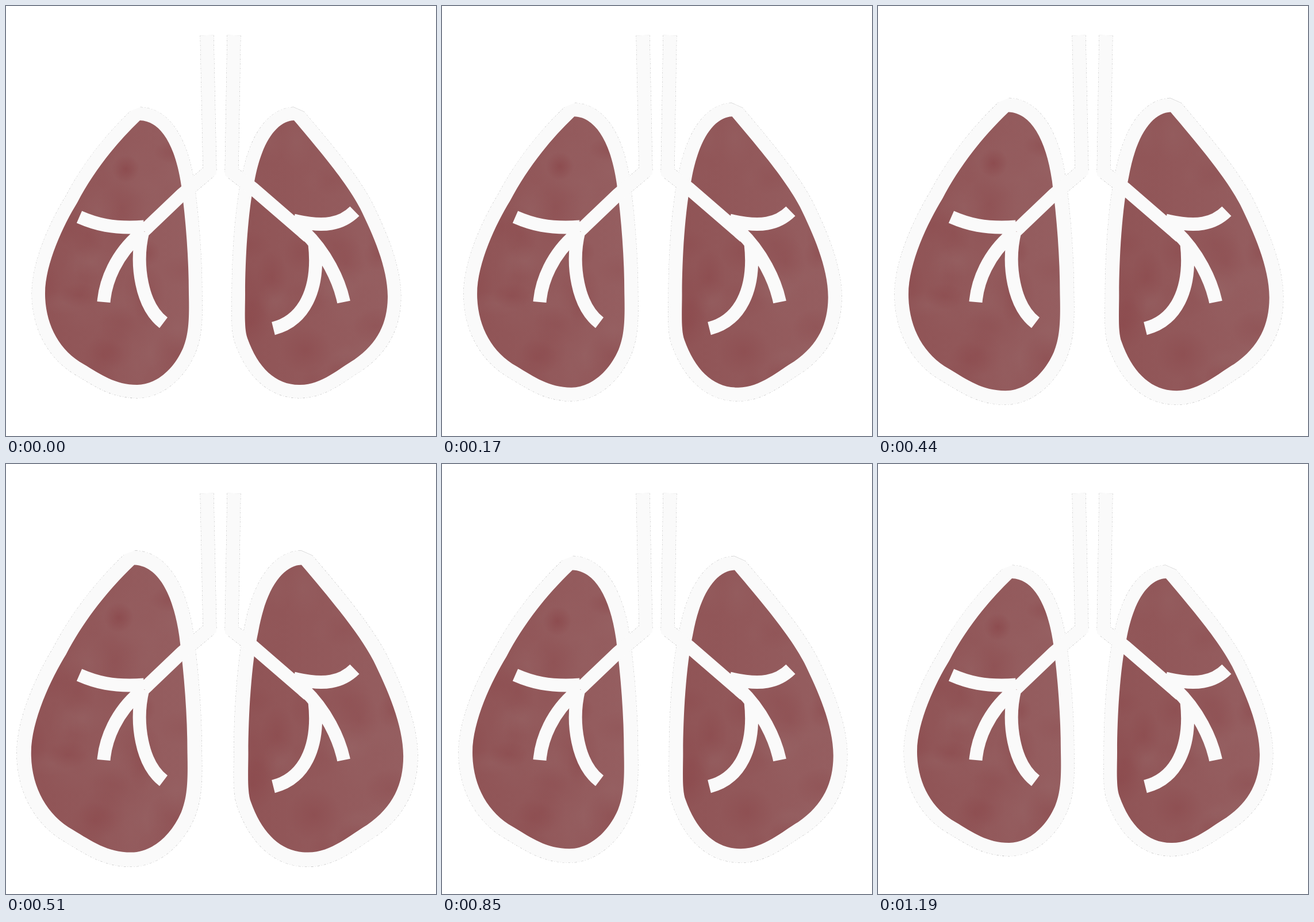
An HTML page for the animation above (1360 ms loop, 748 px wide and 748 px high).

```html
<!DOCTYPE html>
<html lang="en">
<head>
<meta charset="utf-8">
<title>Breathing lungs</title>
<style>
  html, body { margin: 0; width: 100%; height: 100%; overflow: hidden; background: #fff; }
  svg { display: block; width: 100%; height: 100%; }
  .edge { stroke: #bbb; stroke-dasharray: 3 2 1 2; }
  .lung .line { fill: none; stroke-linejoin: bevel; stroke-width: 46; }
  .lung .edge { stroke-width: 46.8; }
  .airway { fill: none; stroke-width: 23; }
  .airway.edge { stroke-width: 24; }
  .white { stroke: #fafafa; }
</style>
</head>
<body>
<svg viewBox="0 0 748 748" xmlns="http://www.w3.org/2000/svg">
  <defs>
    <linearGradient id="flesh">
      <stop offset="0" stop-color="#905456"/>
      <stop offset="1" stop-color="#955e60"/>
    </linearGradient>
    <radialGradient id="dark">
      <stop offset="0" stop-color="#873f43"/>
      <stop offset="1" stop-color="#873f43" stop-opacity="0"/>
    </radialGradient>
    <radialGradient id="pale">
      <stop offset="0" stop-color="#986768"/>
      <stop offset="1" stop-color="#986768" stop-opacity="0"/>
    </radialGradient>

    <path id="leftShape" d="M233 199C267 200 294 238 305 313C313 375 318 440 318 500C319 545 318 570 308 595
      C290 636 258 659 228 659C190 659 165 641 135 623C92 599 68 553 68 500C68 448 100 381 124 342
      C151 290 190 240 233 199Z"/>
    <path id="rightShape" d="M501 199C473 200 445 233 432 306C421 356 416 440 416 500C416 530 414 562 420 578
      C438 629 469 659 510 659C548 660 580 630 606 615C648 586 664 549 664 505C664 455 638 397 616 352
      C596 314 560 268 501 199Z"/>
    <clipPath id="leftClip"><use href="#leftShape"/></clipPath>
    <clipPath id="rightClip"><use href="#rightShape"/></clipPath>

    <!-- windpipe walls, each followed by its three branches -->
    <path id="airways" d="M349.5 51L354.5 287L306 328L240 391
      M127.5 367C155 379 185 388 240 384
      M238 392C224 450 236 522 274 551
      M170 515C173 478 192 432 232 398
      M396.5 51L392.5 289L430 318L526 401
      M606.5 357C584 379 555 386 500 373
      M587.5 515C580 478 556 428 518 392
      M465 561C517 548 546 495 537 414"/>
  </defs>

  <use href="#airways" class="airway edge"/>
  <g class="lung" id="left">
    <use href="#leftShape" class="line edge"/>
    <use href="#leftShape" class="line white"/>
    <use href="#leftShape" fill="url(#flesh)"/>
    <g class="tint" clip-path="url(#leftClip)">
      <circle cx="208" cy="283" r="24" fill="url(#dark)" opacity=".6"/>
    </g>
  </g>
  <g class="lung" id="right">
    <use href="#rightShape" class="line edge"/>
    <use href="#rightShape" class="line white"/>
    <use href="#rightShape" fill="url(#flesh)"/>
    <g class="tint" clip-path="url(#rightClip)"></g>
  </g>
  <use href="#airways" class="airway white"/>
</svg>

<script>
const BEAT = 170, BEATS = 8, SPOTS = 40;
const ANCHOR_Y = 469;

const left = document.getElementById("left");
const right = document.getElementById("right");

let seed = 7;
function random(min, max) {
  seed = (seed * 16807) % 2147483647;
  return min + (max - min) * seed / 2147483647;
}

// soft watercolour blotches
function paint(lung, minX, maxX) {
  const box = lung.querySelector(".tint");
  for (let i = 0; i < SPOTS; i++) {
    const spot = document.createElementNS("http://www.w3.org/2000/svg", "ellipse");
    const attrs = {
      cx: random(minX, maxX), cy: random(200, 660),
      rx: random(20, 50), ry: random(20, 50),
      opacity: random(0.1, 0.35),
      fill: i % 2 ? "url(#dark)" : "url(#pale)"
    };
    for (const key in attrs) spot.setAttribute(key, attrs[key]);
    box.append(spot);
  }
}

// each lung swells from a point beside the windpipe
function swell(lung, anchorX, scale) {
  lung.setAttribute("transform",
    `translate(${anchorX} ${ANCHOR_Y}) scale(${scale}) translate(${-anchorX} ${-ANCHOR_Y})`);
}

function draw(time) {
  const beat = Math.floor(time / BEAT) % BEATS;
  const breath = Math.min(beat, BEATS - 1 - beat);
  const scale = 1 + 0.0225 * breath + 0.0022 * breath ** 2;
  swell(left, 346, scale);
  swell(right, 353, scale);
}

paint(left, 68, 318);
paint(right, 416, 664);
draw(0);

const start = performance.now();
requestAnimationFrame(function tick(now) {
  draw(Math.max(0, now - start));
  requestAnimationFrame(tick);
});
</script>
</body>
</html>
```
